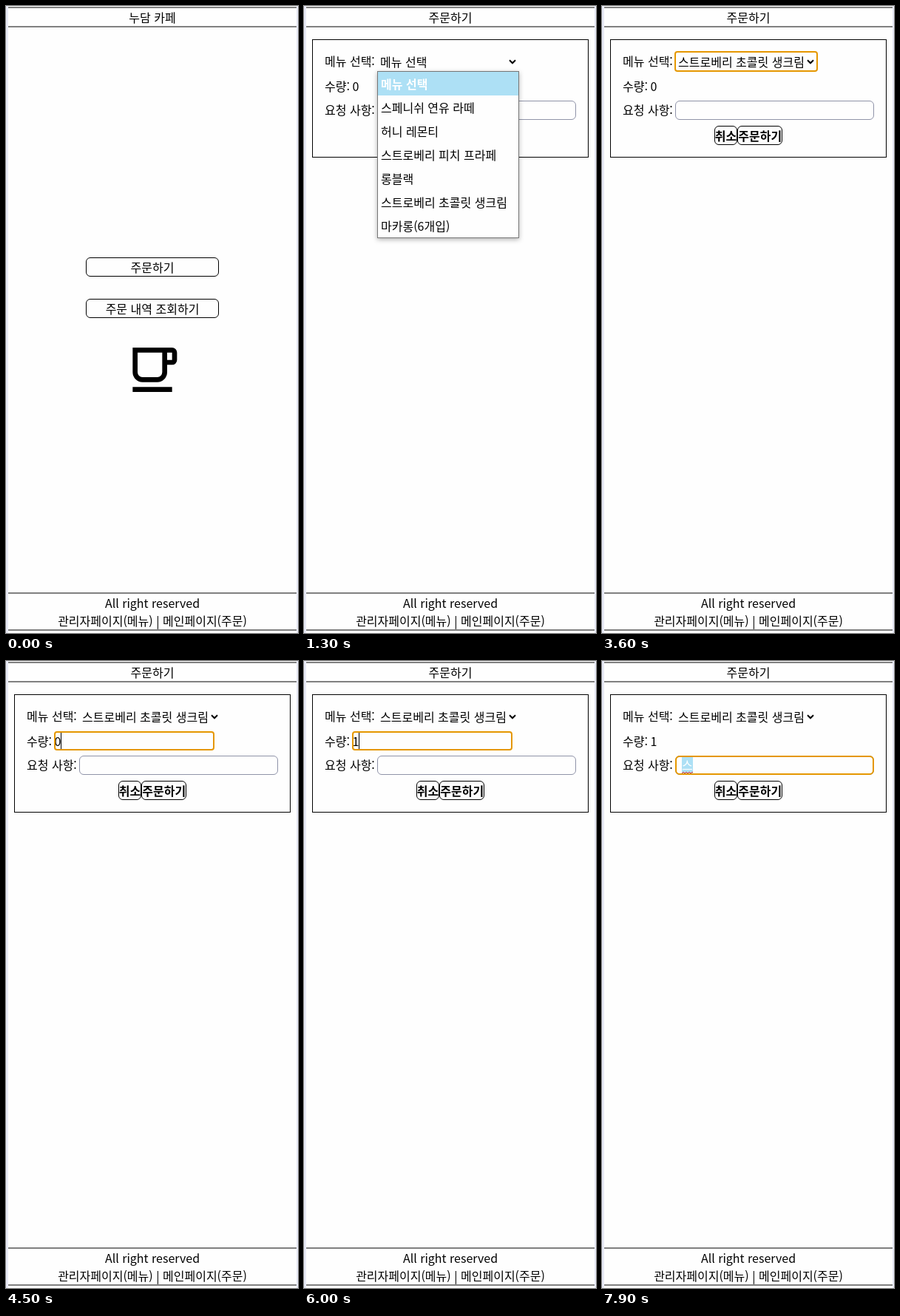
Recreate the animation shown at these times as an HTML page. Size 395 by 848 pixels, loop 8 s.

```html
<!DOCTYPE html>
<html lang="ko">
<head>
<meta charset="utf-8">
<title>주문하기</title>
<style>
html, body { margin: 0; width: 100%; height: 100%; overflow: hidden; background: #e8eaf6; }
svg { display: block; }
text { font: 16px "Noto Sans CJK KR", "Noto Sans CJK", "Noto Sans CJK JP", "Noto Sans", sans-serif; white-space: pre; }
.mid { text-anchor: middle; }
.bold, .active text { font-weight: 700; }
.box { fill: #fefefe; stroke: #000; }
.input { stroke: #8f93a8; }
.ring { fill: none; stroke: #e59700; stroke-width: 2; }
.mark, .active rect { fill: #ade0f5; }
.white, .active text { fill: #fff; }
.row rect { fill: #fefefe; }
.row.active rect { fill: #ade0f5; }
#list { filter: drop-shadow(0 2px 3px rgba(0, 0, 0, .3)); }
</style>
</head>
<body>
<svg width="395" height="848">
  <rect x="3" width="390" height="848" fill="#fefefe"/>
  <path d="M3 2H393M3 28H393M3 794H393M3 844H393" stroke="#808080" stroke-width="2"/>
  <text class="mid" x="198" y="814">All right reserved</text>
  <text class="mid" x="198" y="838">관리자페이지(메뉴) | 메인페이지(주문)</text>

  <!-- home -->
  <g data-t="0 600">
    <text class="mid" x="198" y="22">누담 카페</text>
    <rect class="box" x="108.5" y="340.5" width="179" height="25" rx="5.5"/>
    <text class="mid" x="198" y="360">주문하기</text>
    <rect class="box" x="108.5" y="396.5" width="179" height="25" rx="5.5"/>
    <text class="mid" x="198" y="416">주문 내역 조회하기</text>
    <path transform="translate(158 452) scale(3.3333)" fill="none" stroke="#000" stroke-width="2"
      d="M17 9h3a1 1 0 0 0 1-1V5a1 1 0 0 0-1-1H5v9a3 3 0 0 0 3 3h6a3 3 0 0 0 3-3V4M4 20H20"/>
  </g>

  <!-- order form -->
  <g data-t="600 8000">
    <text class="mid" x="198" y="22">주문하기</text>
    <rect class="box" x="11.5" y="45.5" width="373" height="159"/>
    <text x="28" y="81">메뉴 선택:</text>
    <text x="103" y="82" data-t="600 3600">메뉴 선택</text>
    <text x="103" y="82" data-t="3600 8000">스트로베리 초콜릿 생크림</text>
    <path id="arrow" d="M278 73.3l4 4 4-4" fill="none" stroke="#000" stroke-width="2"/>
    <rect class="ring" x="99" y="62" width="192" height="26" rx="3" data-t="3600 4500"/>

    <text x="28" y="115">수량:</text>
    <rect class="mark" x="66" y="97" width="9" height="22" data-t="5300 6000"/>
    <text x="65.5" y="115" data-t="600 5300">0</text>
    <text class="white" x="65.5" y="115" data-t="5300 6000">0</text>
    <text x="65.5" y="115" data-t="6000 8000">1</text>
    <rect x="74" y="97" width="1" height="22" data-t="4500 4900"/>
    <rect x="74" y="97" width="1" height="22" data-t="6000 6400"/>
    <rect class="ring" x="66" y="96" width="215" height="24" rx="3" data-t="4500 6400"/>

    <text x="28" y="147">요청 사항:</text>
    <rect class="box input" x="99.5" y="128.5" width="268" height="25" rx="5.5"/>
    <rect class="ring" x="100" y="129" width="267" height="24" rx="5" data-t="6400 8000"/>
    <rect x="108" y="130" width="1" height="22" data-t="6400 6800"/>
    <g data-t="7300 8000">
      <rect class="mark" x="108" y="130" width="15" height="22"/>
      <path d="M108 152l2-2 2 2 2-2 2 2 2-2 2 2 2-2 1 1" fill="none" stroke="#d33"/>
      <text class="white" x="108" y="147" data-t="7300 7900">ㅅ</text>
      <text class="white" x="108" y="147" data-t="7900 8000">스</text>
    </g>

    <rect class="box" x="152.5" y="162.5" width="30" height="25" rx="5.5"/>
    <text class="bold mid" x="167.6" y="182">취소</text>
    <rect class="box" x="183.5" y="162.5" width="60" height="25" rx="5.5"/>
    <text class="bold mid" x="213.7" y="182">주문하기</text>
    <g id="list" data-t="1300 3600"></g>
  </g>
</svg>
<script>
const LOOP = 8000;
const list = document.getElementById('list');
const arrow = document.getElementById('arrow');
const menu = ['메뉴 선택', '스페니쉬 연유 라떼', '허니 레몬티', '스트로베리 피치 프라페',
  '롱블랙', '스트로베리 초콜릿 생크림', '마카롱(6개입)'];

list.innerHTML = menu.map((name, i) => `<g class="row" transform="translate(100 ${89 + 32 * i})">
  <rect width="190" height="32"/><text x="4" y="23">${name}</text></g>`).join('') +
  '<rect x="99.5" y="88.5" width="191" height="225" fill="none" stroke="#767676"/>';

const rows = [...list.querySelectorAll('.row')];
const timed = [...document.querySelectorAll('[data-t]')].map(el => {
  const [from, to] = el.dataset.t.split(' ').map(Number);
  return { el, from, to };
});

function draw(t) {
  for (const { el, from, to } of timed) el.style.display = t >= from && t < to ? '' : 'none';
  // the select grows once its options have loaded
  arrow.setAttribute('transform', `translate(${t < 1000 ? -107 : 0} 0)`);
  const active = t < 3500 ? 0 : 5;
  rows.forEach((row, i) => row.classList.toggle('active', i === active));
}

function tick() {
  draw(performance.now() % LOOP);
  requestAnimationFrame(tick);
}
tick();
</script>
</body>
</html>
```
